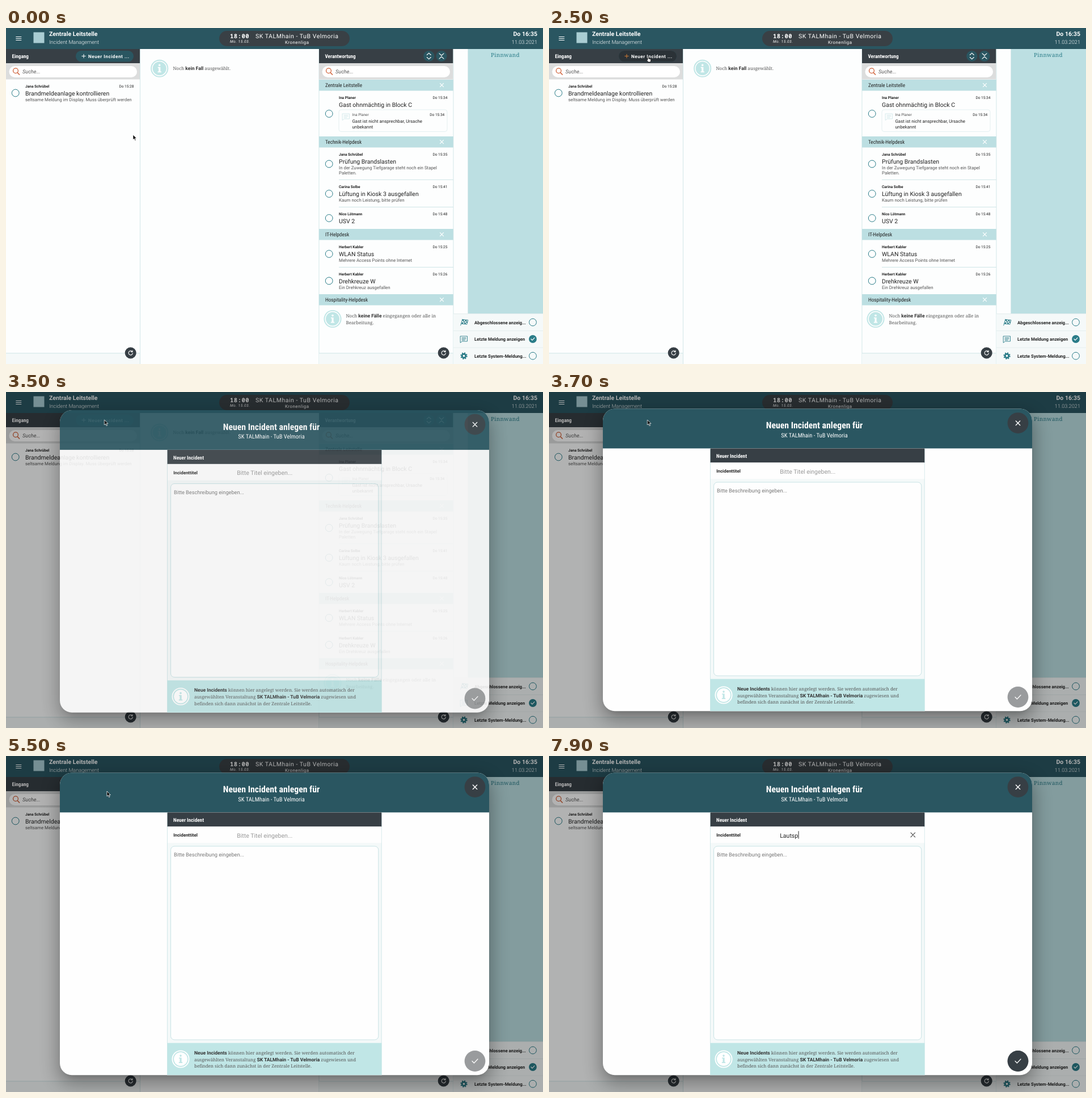
Write an HTML page that moves like this. It is 947 by 592 pixels and loops after 8 s.

```html
<!DOCTYPE html>
<html lang="de">
<head>
<meta charset="utf-8">
<title>Incident Management</title>
<style>
  html, body { margin: 0; width: 100%; height: 100%; overflow: hidden; background: #fdfefe; }
  svg { display: block; width: 947px; height: 592px; }
  text { font-family: Roboto, sans-serif; font-size: 7.89px; fill: #222; text-rendering: geometricPrecision; white-space: pre; }
  .xs { font-size: 6.58px; }
  .md { font-size: 9.2px; }
  .lg { font-size: 10.52px; }
  .xl { font-size: 15.78px; }
  .b { font-weight: 700; }
  .l { font-weight: 300; }
  .i { font-style: italic; }
  .c { font-family: "Roboto Condensed", Roboto, sans-serif; font-stretch: 75%; }
  .slab { font-family: "Roboto Slab", "Noto Serif", serif; font-size: 8px; fill: #555; }
  .slab .b { font-family: Roboto, sans-serif; font-size: 8.55px; fill: #333; }
  .mono { font-family: "Roboto Mono", "Noto Sans Mono", monospace; }
  .sp { letter-spacing: .52px; }
  .end { text-anchor: end; }
  .mid { text-anchor: middle; }
  .w { fill: #fff; }
  .g { fill: #555; }
  .h { fill: #777; }
  .p { fill: #999; }
  .line { fill: none; stroke-linecap: round; stroke-linejoin: round; }

  #modal { opacity: 0; animation: modal 8s step-end infinite; }
  @keyframes modal {
    0% { opacity: 0; }
    43.75% { opacity: .88; transform: translateY(2.5px); }
    44.125% { opacity: 1; transform: none; }
  }
  #cursor { animation: cursor 8s step-end infinite; }
  @keyframes cursor {
    0% { transform: translate(224px, 188px); }
    8.75% { transform: translate(219px, 172px); }
    11.25% { transform: translate(205px, 130px); }
    13.75% { transform: translate(190px, 88px); }
    16.25% { transform: translate(179px, 58px); }
    18.75% { transform: translate(176px, 51px); }
    21.25% { transform: translate(174px, 50px); }
    43.75% { transform: translate(173.5px, 49px); }
    48.75% { transform: translate(174px, 51px); }
    51.25% { transform: translate(175px, 54px); }
    53.75% { transform: translate(177px, 58px); }
    56.25% { transform: translate(178px, 61px); }
    58.75%, 100% { transform: translate(178px, 62px); }
  }
  #caret { animation: caret 8s step-end infinite; }
  @keyframes caret {
    0% { transform: none; }
    73.75% { transform: translateX(5.7px); }
    76.25% { transform: translateX(11.4px); }
    83.75% { transform: translateX(17.2px); }
    86.25% { transform: translateX(20.6px); }
    96.25% { transform: translateX(26px); }
    98.75%, 100% { transform: translateX(32px); }
  }
</style>
</head>
<body>
<svg id="stage" viewBox="0 0 947 592" xmlns="http://www.w3.org/2000/svg"></svg>
<script>
const TEAL = '#2a5661', DARK = '#373f45', PALE = '#bcdfe2', MINT = '#c0e6e6', ICON = '#2a7c88', RULE = '#cfe5e7';
const HOME = 'SK TALMhain', AWAY = 'TuB Velmoria', MATCH = `${HOME} - ${AWAY}`;

const text = (x, y, s, cls = '') => `<text x="${x}" y="${y}" class="${cls}">${s}</text>`;
const bold = s => `<tspan class="b">${s}</tspan>`;
const rect = (x, y, w, h, fill, r = 0, more = '') =>
  `<rect x="${x}" y="${y}" width="${w}" height="${h}" rx="${r}" fill="${fill}" ${more}/>`;
const disc = (x, y, r, fill) => `<circle cx="${x}" cy="${y}" r="${r}" fill="${fill}"/>`;
const ring = (x, y, r, color, w = 1) =>
  `<circle cx="${x}" cy="${y}" r="${r}" fill="none" stroke="${color}" stroke-width="${w}"/>`;
const stroke = (x, y, d, color = '#fff', w = 1) =>
  `<path class="line" transform="translate(${x} ${y})" d="${d}" stroke="${color}" stroke-width="${w}"/>`;
const cross = (x, y, r, color, w) => stroke(x, y, `M${-r} ${-r}L${r} ${r}M${r} ${-r}L${-r} ${r}`, color, w);
const plus = color => stroke(137, 49.5, 'M-3.2 0H3.2M0-3.2V3.2', color, 1);
const check = (x, y, k) => stroke(x, y, `M${-4 * k} 0L${-1.3 * k} ${2.8 * k}L${4 * k} ${-2.8 * k}`, '#fff', 1.2);

const info = (x, y, fg, bg) => ring(x, y, 14.6, fg, 1.9) + disc(x, y, 12, fg) +
  `<path transform="translate(${x} ${y})" fill="${bg}" d="M-3-2.6H1.6V5.3H3.2V7H-3.2V5.3H-1.5V-.9H-3Z"/>` +
  disc(x, y - 5.9, 1.8, bg);

const chat = (x, y, color) =>
  stroke(x, y, 'M-6-5H6V4H-3L-6 6.3ZM-3.5-2.3H3.5M-3.5-.2H3.5M-3.5 1.9H1.5', color, .9);

const gear = (x, y) => ring(x, y, 3.3, ICON, 2.8) +
  `<circle cx="${x}" cy="${y}" r="5.2" fill="none" stroke="${ICON}" stroke-width="2" stroke-dasharray="2.04 2.04"/>`;

function flag(x, y) {
  let cells = '';
  for (let r = 0; r < 3; r++)
    for (let c = 0; c < 4; c++)
      if ((r + c) % 2 === 0) cells += rect(c * 2.4 - 3.4, r * 2.4 - 4.4, 2.4, 2.4, ICON);
  return `<g transform="translate(${x} ${y}) skewX(-10) rotate(6)">${cells}
    <path class="line" stroke="${ICON}" d="M-4.2-5V6M-3.4-4.4H6.2V2.8H-3.4" stroke-width=".9"/></g>`;
}

const refresh = x => disc(x, 572.5, 10, DARK) +
  stroke(x, 572.5, 'M2.8-2.3A3.6 3.6 0 1 0 3.6.6M3.3-4.2V-1.7H.8', '#fff', 1.1);

// Dark heading, search field and footer shared by both columns
const column = (x, title) =>
  rect(x, 37, 236.5, 25, DARK) + text(x + 10.5, 53.2, title, 'c b md w') +
  rect(x, 62, 236.5, 28.5, '#dcdddd') + rect(x + 5.5, 67, 225.5, 20, '#fff', 10) +
  ring(x + 17, 75.3, 4.4, '#cf6038', 1.3) + stroke(x + 20.3, 78.7, 'M0 0L3.2 3.4', '#cf6038', 1.5) +
  text(x + 29, 80, 'Suche...', 'i md g') +
  rect(x, 573, 236.5, 19, '#f5f9f9') + rect(x, 572.5, 236.5, 1, RULE) + refresh(x + 219.7);

const item = (x, y, mark, who, when, title, ...lines) =>
  ring(x - 17.3, mark, 6.4, ICON) + text(x, y, who, 'b xs') + text(x + 191.5, y, when, 'xs end') +
  text(x, y + 14, title, 'lg') + lines.map((s, i) => text(x, y + 24.4 + i * 9.5, s, 'g')).join('');

const section = (y, title) => rect(552, y, 237, 19.5, PALE) +
  text(563, y + 13, title, 'c md') + cross(768.5, y + 9.7, 3, '#fff', 1.2);

const divider = y => rect(587, y, 202, 1, RULE);

const option = (y, s) => rect(789, y, 158, 29.7, '#f5f9f9') + rect(789, y, 158, .8, '#e0ecec') +
  text(826, y + 18.2, s, 'b');

const header = () => rect(0, 0, 947, 37, TEAL) +
  stroke(22.3, 18.5, 'M-4.5-3H4.5M-4.5 0H4.5M-4.5 3H4.5', '#fff', 1.2) +
  rect(48.5, 7.5, 19, 19, '#a9cdd3') +
  text(76, 13.8, 'Zentrale Leitstelle', 'b lg w') + text(76, 27.8, 'Incident Management', 'l md w') +
  rect(376, 5, 230, 27, '#394045', 13.5) +
  text(395, 18, '18:00', 'mono b lg sp w') + text(395, 26, 'Mo. 15.03.', 'i xs sp w') +
  text(513.2, 18, MATCH, 'lg sp mid w') + text(513.2, 28.2, 'Kronenliga', 'sp mid w') +
  text(937, 13.8, 'Do 16:35', 'b lg end w') + text(937, 27.8, '11.03.2021', 'l md end w');

const inbox = () => column(0, 'Eingang') +
  rect(123, 40, 102, 19.5, TEAL, 9.75) + plus('#fff') +
  `<g class="hover">${rect(123, 40, 102, 19.5, '#2b3237', 9.75)}${plus('#d07a35')}</g>` +
  `<text x="145" y="52.6" class="b sp w" style="font-size:8.2px">Neuer Incident ...</text>` +
  item(34, 104.7, 114.5, 'Jana Schrübel', 'Do 15:28', 'Brandmeldeanlage kontrollieren',
    'seltsame Meldung im Display. Muss überprüft werden') +
  rect(236, 37, .9, 555, RULE);

const middle = () => info(270.7, 71.3, MINT, '#fff') +
  text(294.5, 74.4, `Noch ${bold('kein Fall')} ausgewählt.`, 'slab');

const duties = () => rect(551.5, 37, .9, 555, RULE) + column(552, 'Verantwortung') +
  disc(745.8, 49.5, 9.6, TEAL) + stroke(745.8, 49.5, 'M-3.5-2L0-5.3 3.5-2M-3.5 2L0 5.3 3.5 2', '#fff', 1.1) +
  disc(768, 49.5, 9.6, TEAL) + stroke(768, 49.5, 'M-4-4.7L0-1 4-4.7M-4 4.7L0 1 4 4.7', '#fff', 1.1) +
  section(91, 'Zentrale Leitstelle') +
  item(587, 124.5, 151, 'Ina Planer', 'Do 15:34', 'Gast ohnmächtig in Block C') +
  rect(587, 144, 191, 38.5, '#fdfefe', 4, 'stroke="#e1eff0" stroke-width=".9"') + chat(599.5, 156, '#d2e8ea') +
  text(610.5, 154.9, 'Ina Planer', 'xs g') + text(773.3, 154.9, 'Do 15:34', 'xs end') +
  text(610.5, 167, 'Gast ist nicht ansprechbar, Ursache') + text(610.5, 176.6, 'unbekannt') +
  section(191, 'Technik-Helpdesk') +
  item(587, 224.5, 239.5, 'Jana Schrübel', 'Do 15:35', 'Prüfung Brandslasten',
    'In der Zuwegung Tiefgarage steht noch ein Stapel', 'Paletten.') +
  divider(266.8) +
  item(587, 281.6, 292, 'Carina Solbe', 'Do 15:41', 'Lüftung in Kiosk 3 ausgefallen', 'Kaum noch Leistung, bitte prüfen') +
  divider(315) +
  item(587, 329.6, 335, 'Nico Lötmann', 'Do 15:48', 'USV 2') +
  section(354, 'IT-Helpdesk') +
  item(587, 387.5, 398, 'Herbert Kabler', 'Do 15:25', 'WLAN Status', 'Mehrere Access Points ohne Internet') +
  divider(421) +
  item(587, 435.6, 445.5, 'Herbert Kabler', 'Do 15:26', 'Drehkreuze W', 'Ein Drehkreuz ausgefallen') +
  section(469, 'Hospitality-Helpdesk') + info(576, 512.5, MINT, '#fff') +
  text(599.5, 509.7, `Noch ${bold('keine Fälle')} eingegangen oder alle in`, 'slab') +
  text(599.5, 521.5, 'Bearbeitung.', 'slab') +
  rect(788.5, 37, .9, 555, RULE);

const board = () => rect(814, 37, 1.2, 466, '#dcebec') + rect(815, 37, 132, 466, PALE) +
  `<text x="855" y="51.4" class="slab" style="font-size:9.8px;letter-spacing:.35px;fill:${ICON}">Pinnwand</text>` +
  option(503.3, 'Abgeschlossene anzeig...') + flag(807.5, 518.5) + ring(929, 518.5, 6.4, ICON) +
  option(533, 'Letzte Meldung anzeigen') + chat(807.5, 548, ICON) +
  disc(929, 548, 6.9, ICON) + check(929, 548, .75) +
  option(562.7, 'Letzte System-Meldung...') + gear(807.5, 577.7) + ring(929, 577.7, 6.4, ICON);

const typed = [...'Lautsp'].map((ch, i) => `<tspan class="key${i}">${ch}</tspan>`).join('');

const modal = () => `<g id="modal">
  ${rect(91, 38, 765, 540, '#000', 24, 'opacity=".32" filter="url(#wide)"')}
  ${rect(100, 41, 747, 524, '#000', 21, 'opacity=".14" filter="url(#tight)"')}
  <g clip-path="url(#sheet)">
    ${rect(95, 29, 757, 534, '#fefefe')}${rect(95, 29, 757, 70.4, TEAL)}
    ${rect(284.4, 99.4, 378, 464, '#f4f9f9')}
    ${rect(284, 99.4, .9, 464, RULE)}${rect(661.7, 99.4, .9, 464, RULE)}
    ${rect(284.6, 99.4, 377.7, 25, DARK)}${rect(285, 124.4, 376.7, 28.8, '#fefefe')}
    ${rect(284.4, 505.6, 378, 57, MINT)}
  </g>
  ${text(468, 64.2, 'Neuen Incident anlegen für', 'c b xl mid w')}
  ${text(468, 79.7, MATCH, 'c lg mid w')}
  ${disc(827, 54.6, 18.4, DARK)}${cross(827, 54.7, 3.7, '#fff', 1.4)}
  ${text(295, 116, 'Neuer Incident', 'c b md w')}
  ${text(295.3, 142.3, 'Incidenttitel', 'b')}
  <g class="hint">${text(407.2, 143.6, 'Bitte Titel eingeben...', 'lg p')}</g>
  ${text(407.2, 143.6, typed, 'lg')}
  <g id="caret"><g class="beam">${rect(407.6, 132.3, .9, 13.4, '#111')}</g></g>
  <g class="filled">${cross(641.8, 139, 3.8, '#444', 1.1)}</g>
  ${rect(290.5, 159, 366.3, 341, '#fefefe', 6.5, 'stroke="#c3e0e3" stroke-width=".9"')}
  ${text(296, 177, 'Bitte Beschreibung eingeben...', 'md h')}
  ${info(308, 534, '#fff', MINT)}
  ${text(332, 525.8, `${bold('Neue Incidents')} können hier angelegt werden. Sie werden automatisch der`, 'slab')}
  ${text(332, 537.6, `ausgewählten Veranstaltung ${bold(MATCH)} zugewiesen und`, 'slab')}
  ${text(332, 549.4, 'befinden sich dann zunächst in der Zentrale Leitstelle.', 'slab')}
  ${disc(827, 537.5, 18.4, '#999b9d')}
  <g class="filled">${disc(827, 537.5, 18.4, DARK)}</g>
  ${check(827, 537.5, 1.25)}
</g>`;

const cursor = () => `<g id="cursor" stroke-linejoin="round" stroke-width=".8">
  <path class="arrow" fill="#000" stroke="#fff" d="M0 0V9L2.1 7.1 3.6 10.6 5.1 10 3.6 6.6H6.3Z"/>
  <path class="hand" fill="#fff" stroke="#000" d="M0 1A.9.9 0 0 1 1.8 1V4L4.9 4.8Q5.9 5.1 5.7 6.3L5.1 10H1L-1.8 6.4Q-1.2 5.2 0 6.2Z"/>
</g>`;

const blur = (id, size) => `<filter id="${id}" x="-10%" y="-12%" width="120%" height="124%">
  <feGaussianBlur stdDeviation="${size}"/></filter>`;

document.getElementById('stage').innerHTML = `<defs>
    <clipPath id="sheet">${rect(95, 29.5, 757, 532.7, '#000', 21)}</clipPath>
    ${blur('wide', 16)}${blur('tight', 5)}
  </defs>` + rect(0, 0, 947, 592, '#fdfefe') + inbox() + middle() + duties() + board() + header() +
  `<g class="back">${rect(0, 0, 947, 592, '#000', 0, 'opacity=".3"')}</g>` + modal() + cursor();

// Shows a class only during the given [from, to] spans of the 8 s loop
const during = (name, ...spans) => `@keyframes ${name}{0%,100%{visibility:hidden}` +
  spans.map(([a, b]) => `${a / 80}%{visibility:visible}${b / 80}%{visibility:hidden}`).join('') +
  `}.${name}{animation:${name} 8s step-end infinite}`;

const keyTimes = [5900, 6100, 6700, 6900, 7700, 7900];
const rules = document.createElement('style');
rules.textContent = [
  during('arrow', [0, 1700], [3500, 5900]),
  during('hand', [1700, 3500]),
  during('hover', [1700, 3500]),
  during('back', [3500, 8000]),
  during('hint', [0, 5900]),
  during('filled', [5900, 8000]),
  during('beam', [4900, 5500], [5900, 7500], [7700, 8000]),
  ...keyTimes.map((t, i) => during('key' + i, [t, 8000]))
].join('\n');
document.head.append(rules);
</script>
</body>
</html>
```
